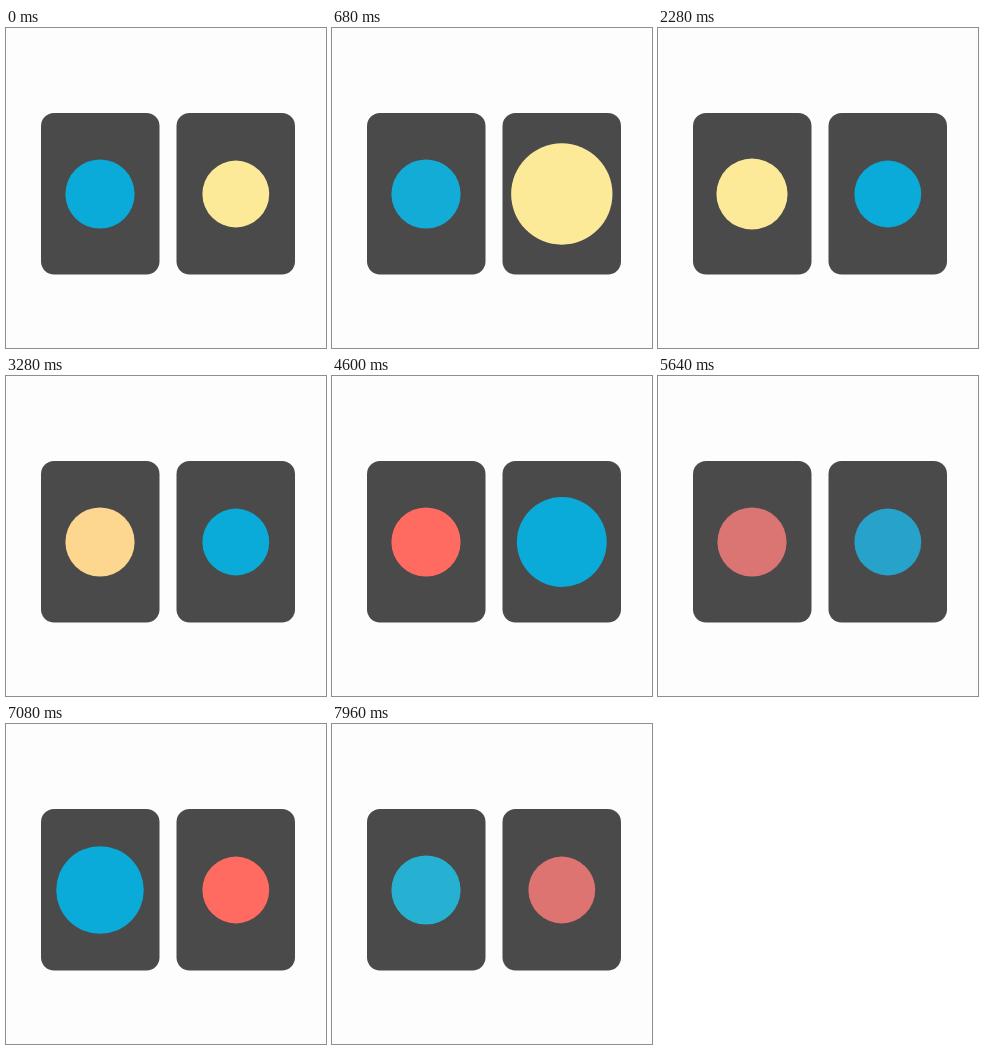
These frames come from a looping animation (320 by 320 pixels, 8000 ms). An HTML page:

```html
<!DOCTYPE html>
<html lang="en">
<head>
<meta charset="utf-8">
<title>Pulsing dots</title>
<style>
  html, body { margin: 0; height: 100%; overflow: hidden; background: #fdfdfd; }
  svg { display: block; width: 100vw; height: 100vh; }
</style>
</head>
<body>
<svg viewBox="0 0 320 320">
  <g fill="#4a4a4a">
    <rect x="35" y="85" width="118.5" height="161.5" rx="13"/>
    <rect x="170.5" y="85" width="118.5" height="161.5" rx="13"/>
  </g>
  <circle id="left" cx="94" cy="166"/>
  <circle id="right" cx="229.8" cy="166"/>
</svg>
<script>
const LOOP = 8000, STEP = 40, PULSE = 1050;
const BLUE = [10, 170, 217], YELLOW = [253, 234, 153], RED = [255, 107, 97];

// Each dot swells and changes colour on two independent cycles.
const dots = [
  {
    el: document.getElementById('left'),
    rest: 34.6, peak: 50,
    pulse: { start: 2195, period: 4130 },
    fade: { start: 500, period: 2371, length: 1562 },
    colors: [BLUE, YELLOW, RED, BLUE, YELLOW]
  },
  {
    el: document.getElementById('right'),
    rest: 33.4, peak: 51.4,
    pulse: { start: 223, period: 4067 },
    fade: { start: 736, period: 2288, length: 1477 },
    colors: [YELLOW, BLUE, BLUE, RED, BLUE]
  }
];

const easeInOut = x => (1 - Math.cos(Math.PI * x)) / 2;

function radiusAt({ rest, peak, pulse }, t) {
  if (t < pulse.start) return rest;
  const x = Math.min(((t - pulse.start) % pulse.period) / PULSE, 1);
  return rest + (peak - rest) * Math.sin(Math.PI * x) ** 2;
}

function colorAt({ fade, colors }, t) {
  if (t < fade.start) return colors[0];
  const elapsed = t - fade.start;
  const i = Math.floor(elapsed / fade.period);
  const k = easeInOut(Math.min((elapsed % fade.period) / fade.length, 1));
  return colors[i].map((c, n) => Math.round(c + (colors[i + 1][n] - c) * k));
}

function draw() {
  const t = Math.floor((performance.now() % LOOP) / STEP) * STEP;
  for (const dot of dots) {
    dot.el.setAttribute('r', radiusAt(dot, t));
    dot.el.setAttribute('fill', `rgb(${colorAt(dot, t)})`);
  }
  requestAnimationFrame(draw);
}
draw();
</script>
</body>
</html>
```
